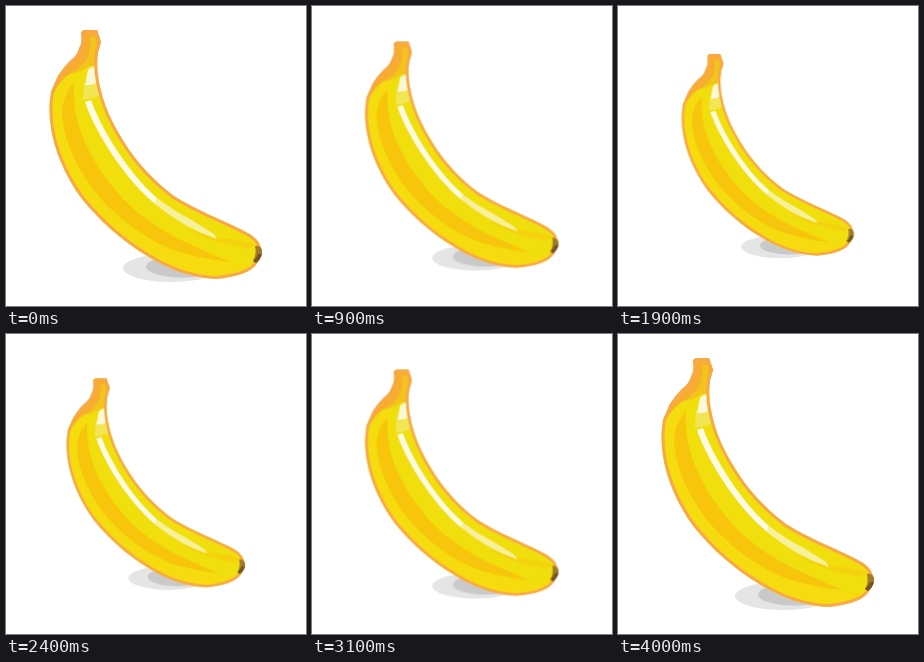
These frames come from a looping animation (300 px wide and 300 px high, 4.1 s). An HTML page:

```html
<!DOCTYPE html>
<html lang="en">
<head>
<meta charset="utf-8">
<title>Banana</title>
<style>
  html, body { margin: 0; width: 100%; height: 100%; overflow: hidden; background: #fff; }
  svg { display: block; width: 100vw; height: 100vh; }
  #banana { transform-origin: 150px 150px; }
</style>
</head>
<body>
<svg viewBox="0 0 300 300">
  <defs>
    <path id="skin" d="M75 27Q76 24 80 24L91 24L95 36L92 46Q90 60 93 76C97 98 106 117 118 136C131 157 148 175 168 190C188 203 214 213 238 225Q253 232 255 242Q257 251 249 260Q240 270 210 273C186 272 162 263 143 251C117 236 93 214 76 193C58 169 48 142 45 122Q42 103 45 86L52 70Q57 62 64 55Q71 50 73 43Q77 36 75 27Z"/>
    <clipPath id="inside"><use href="#skin"/></clipPath>
  </defs>
  <g id="banana">
    <!-- shadow -->
    <ellipse cx="165" cy="262" rx="48" ry="14" fill="#e5e5e5"/>
    <ellipse cx="176" cy="260.5" rx="36" ry="11" fill="#c9c9c9"/>

    <use href="#skin" fill="#f0de0d"/>
    <g clip-path="url(#inside)">
      <!-- outer side -->
      <path fill="#f6dc0f" d="M64 68Q50 82 47 104C49 145 70 188 101 222C133 253 178 272 222 270L246 262L224 257C190 252 150 242 118 217C84 187 60 145 58 103Q60 84 68 76Z"/>
      <!-- deep band -->
      <path fill="#f7c50b" d="M68 77Q57 88 56 106C57 135 72 163 89 186C110 211 138 233 170 245Q197 253 224 256Q207 249 188 240C163 229 139 215 118 194C96 170 79 143 72 117Q67 98 68 77Z"/>
      <path fill="#f4d20d" d="M178 222Q209 232 238 235L249 239L243 243Q207 237 178 222Z"/>
      <!-- stem -->
      <path fill="#f6ad30" d="M72 20H98L93 46L91 56L83 56Q77 64 65 67Q54 74 47 88L40 84L68 48Z"/>
      <path fill="#f3c51c" d="M85 31L90 31L91 46L90 60L83 60Q76 66 64 68Q78 60 83 48Z"/>
      <!-- shine -->
      <path fill="#f3e654" d="M78 77L93 75L95 89L87 92L77 94Z"/>
      <path fill="#fbf8d6" d="M82 64Q86 59 91 61L93 76L85 79L79 79Z"/>
      <path fill="#fdfbe4" d="M79 96L85 94C93 117 118 163 151 192L149 198C115 169 88 123 79 96Z"/>
      <path fill="#f8f19c" d="M151 192Q168 205 184 213L208 228L211 233Q178 222 149 198Z"/>
    </g>
    <use href="#skin" fill="none" stroke="#f8a84a" stroke-width="6" stroke-linejoin="round" clip-path="url(#inside)"/>
    <!-- tip -->
    <path fill="#a27a2c" d="M249 240Q254 239 256 244Q257 251 250 257L247 255Q251 248 249 240Z"/>
    <path fill="#735522" d="M252 248L256 248Q255 253 250 257L247 255Q251 252 252 248Z"/>
  </g>
</svg>
<script>
  const LOOP = 4100, MIN = 0.81, STEP = 'steps(19, end)';
  // [time, scale, easing to the next entry]
  const poses = [
    [0, 1, STEP],
    [1900, MIN, 'linear'],
    [2100, MIN, STEP],
    [4000, 1, 'linear'],
    [LOOP, 1, 'linear']
  ];
  const keys = poses.map(([t, s, easing]) => ({ offset: t / LOOP, transform: `scale(${s})`, easing }));

  // A 1 ms lead keeps rounding away from the step edges.
  document.getElementById('banana').animate(keys, { duration: LOOP, iterations: Infinity, delay: -1 });
</script>
</body>
</html>
```
